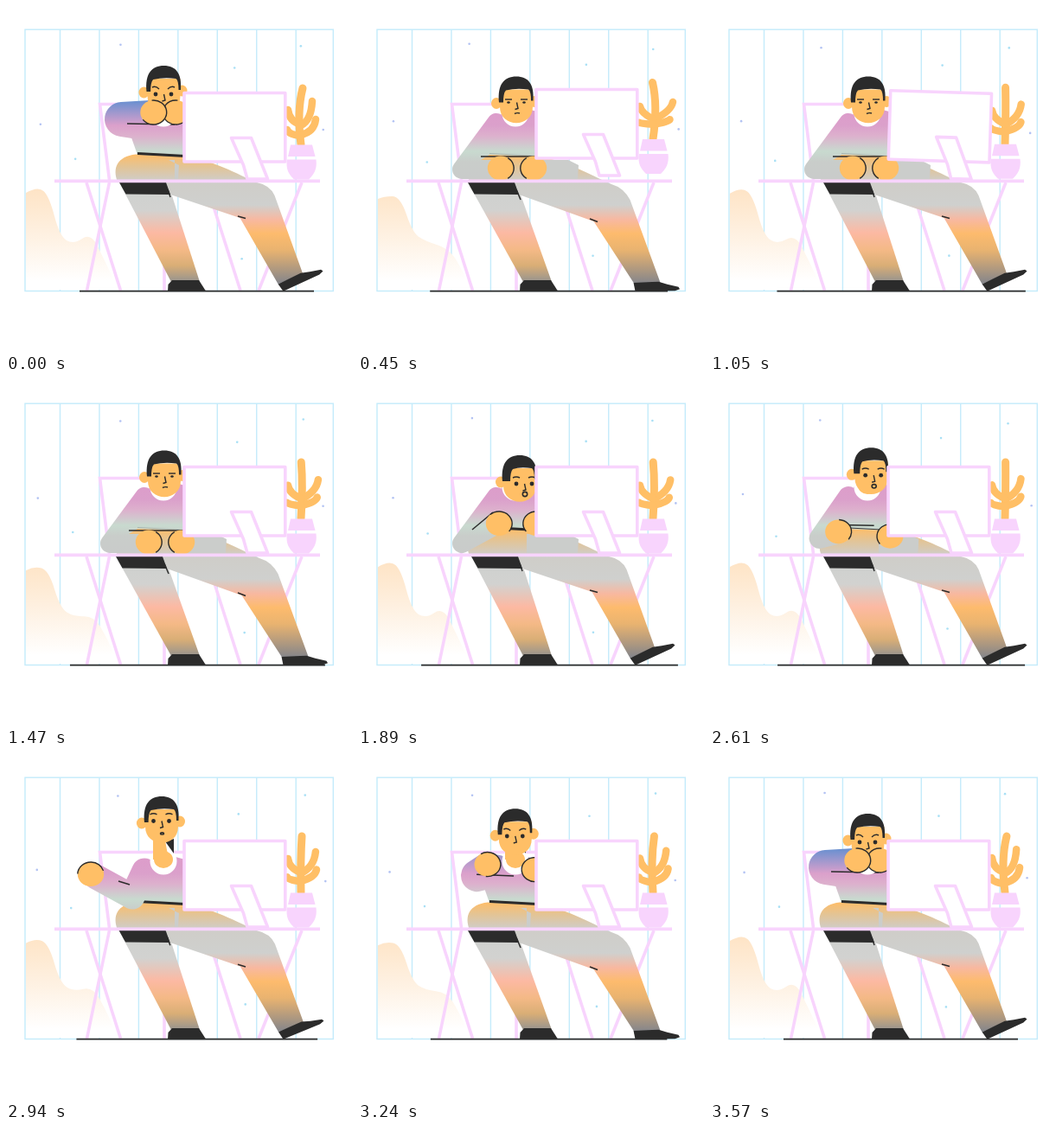
Recreate the animation shown at these times as an HTML page with a canvas. Size 400x400 px, loop 3.6 s.

```html
<!DOCTYPE html>
<html lang="en">
<head>
<meta charset="utf-8">
<title>Desk work</title>
<style>
html, body { margin: 0; width: 100%; height: 100%; overflow: hidden; background: #fff; }
canvas { display: block; }
</style>
</head>
<body>
<canvas id="stage" width="400" height="400"></canvas>
<script>
const ctx = document.getElementById('stage').getContext('2d');
const LOOP = 3600, TAU = Math.PI * 2;
const INK = '#2b2b2b', SKIN = '#ffbf66', PINK = '#f8d4fd', BLUE = '#c4ebfb';
const SHOULDER = [160, 135];

const lerp = (a, b, k) => a + (b - a) * k;
const mix = (a, b, k) => a.map((v, i) => lerp(v, b[i], k));
const clamp = k => Math.min(1, Math.max(0, k));
const ease = k => k * k * (3 - 2 * k);
const wave = (t, peak, period) => .5 + .5 * Math.cos((t - peak) / period * TAU);

// eyes: offset of their middle; arc: middle and half width of the hand outline;
// mood: anger, surprise, wakefulness; reach: right arm on the desk
const type = {
  head: [183, 112.5], eyes: [0, -1], elbow: [120, 189], wrist: [165, 189], thick: [22],
  left: [165, 187.5], right: [203, 187.5], arc: [0, 1], crease: [142, 174, 205, 174],
  mood: [0, 0, 0], blue: [0], reach: [1], belt: [.2]
};
const shock = { ...type, head: [188.5, 119], eyes: [3.2, 2], mood: [0, 1, 1] };
const up = {
  ...shock, head: [187, 118], eyes: [5, 2], wrist: [155, 170], left: [163, 166],
  right: [206, 166], arc: [-.8, 1.5], crease: [132, 173, 156, 153], belt: [3]
};
const lean = {
  head: [182.5, 100], eyes: [-.5, 2], elbow: [134, 131], wrist: [168, 129], thick: [40],
  left: [170.5, 123], right: [196.5, 123], arc: [.4, 2.1], crease: [140, 136, 195, 137],
  mood: [1, 0, 1], blue: [1], reach: [0], belt: [3]
};
const greet = {
  ...lean, head: [180, 80], eyes: [-.5, -2.5], elbow: [146, 165], wrist: [104, 142], thick: [29],
  left: [98, 139], right: [224, 160], arc: [-1.7, 1.4], crease: [130, 147, 143, 151],
  mood: [0, .3, 1], blue: [0]
};
const ACTS = [
  [0, lean], [100, lean], [330, type], [1600, type], [1800, up], [1980, up],
  [2150, shock], [2520, shock], [2800, greet], [3060, greet], [3340, lean], [LOOP, lean]
];

function poseAt(t) {
  const i = ACTS.findIndex(([end]) => t < end);
  const [t0, a] = ACTS[i - 1], [t1, b] = ACTS[i];
  const k = ease((t - t0) / (t1 - t0)), pose = {};
  for (const part in a) pose[part] = mix(a[part], b[part], k);
  return pose;
}

// The desk is struck at a steady beat; every second blow tilts the screen.
function blowAt(t) {
  const beat = Math.round((t - 450) / 630);
  const force = beat < 0 || beat > 3 ? 0 : ease(clamp(1.15 - Math.abs(t - 450 - beat * 630) / 130));
  return beat % 2 ? { hop: 0, tilt: force } : { hop: force, tilt: 0 };
}

function fill(color) { ctx.fillStyle = color; ctx.fill(); }
function stroke(color, width) { ctx.strokeStyle = color; ctx.lineWidth = width; ctx.stroke(); }
function poly(p, open) {
  ctx.beginPath();
  for (let i = 0; i < p.length; i += 2) ctx.lineTo(p[i], p[i + 1]);
  if (!open) ctx.closePath();
}
function line(p, color, width) { poly(p, true); stroke(color, width); }
function oval(x, y, rx, ry = rx) { ctx.beginPath(); ctx.ellipse(x, y, rx, ry, 0, 0, TAU); }
function curve(x, y, ...rest) {
  const [width, color] = [rest.pop(), rest.pop()];
  ctx.beginPath();
  ctx.moveTo(x, y);
  ctx.quadraticCurveTo(...rest);
  stroke(color, width);
}
function shade(y0, y1, stops) {
  const g = ctx.createLinearGradient(0, y0, 0, y1);
  stops.forEach(([y, c]) => g.addColorStop((y - y0) / (y1 - y0), c));
  return g;
}

// x, y, start angle in turns, direction
const STARS = [
  [130, 46, -.08, -1], [266, 69.5, .36, 1], [343, 48, .61, -1], [38.5, 134.5, .17, -1],
  [78, 178.5, -.11, 1], [274, 290, .33, 1], [369, 144.5, .6, 1]
];

function drawRoom(t) {
  ctx.strokeStyle = BLUE;
  ctx.lineWidth = 1.4;
  ctx.strokeRect(22, 27.2, 356.3, 302.3);
  for (let i = 0; i < 7; i++) {
    const x = 62.5 + i * 45.45;
    line([x, 27, x, 329], BLUE, 1.4);
  }
  STARS.forEach(([x, y, start, dir], i) => {
    const a = (start + dir * t / 1800) * TAU;
    oval(x + 2.8 * Math.cos(a), y + 2.6 * Math.sin(a), 1.3);
    fill(i % 3 ? '#a9e0f5' : '#b3c3f3');
  });
}

function drawHill(k) {
  const p = mix([23, 216, 37, 208, 50, 220, 62, 266, 78, 276, 98, 262, 113, 292, 130, 328],
    [23, 223, 30, 220, 49, 220, 63, 262, 78, 272, 104, 280, 118, 300, 130, 328], k);
  ctx.beginPath();
  ctx.moveTo(23, 328);
  ctx.lineTo(p[0], p[1]);
  for (let i = 2; i < p.length - 2; i += 2) {
    ctx.quadraticCurveTo(p[i], p[i + 1], (p[i] + p[i + 2]) / 2, (p[i + 1] + p[i + 3]) / 2);
  }
  ctx.lineTo(130, 328);
  fill(shade(212, 320, [[212, '#fee4c6'], [262, '#fef0e0'], [318, '#ffffff']]));
}

function drawFurniture() {
  poly([108.5, 113.5, 210, 113.5, 210, 200, 119.5, 200]);
  fill('#fff');
  line([210, 113.5, 108.5, 113.5, 119.5, 201], PINK, 3.6);
  for (const [top, foot] of [[183, 183], [93, 132.5], [119.5, 93.5], [231, 271], [342, 292]]) {
    line([top, 204, foot, 329], PINK, 3.6);
  }
}

function drawLegs(k) {
  const slide = -4 * k, tip = -.42 * (1 - k);
  const foot = (x, y) => [
    320.5 + x * Math.cos(tip) - y * Math.sin(tip),
    329.7 + x * Math.sin(tip) + y * Math.cos(tip)
  ];
  poly([131 + slide, 204, 187 + slide, 204, 224, 319, 191, 319]);
  fill(shade(204, 319, [[204, '#cdd0ce'], [236, '#d2d2d0'], [262, '#fcb9a3'], [282, '#f4b986'],
    [300, '#d9ae76'], [319, '#96938f']]));

  ctx.beginPath();
  ctx.moveTo(129, 203);
  ctx.bezierCurveTo(123, 188, 128, 174, 150, 171.5);
  ctx.lineTo(200, 172);
  ctx.bezierCurveTo(238, 177, 268, 195, 290 + 3 * k, 204 + 2 * k);
  ctx.quadraticCurveTo(305 + 2 * k, 207 + 3 * k, 310.5 + 4 * k, 219 + 5 * k);
  ctx.lineTo(...foot(29, -10));
  ctx.lineTo(...foot(-2, -10));
  ctx.lineTo(270.5 + 2 * k, 245 + 4 * k);
  ctx.lineTo(190 + slide, 218);
  ctx.lineTo(185 + slide, 203);
  fill(shade(172, 320, [[172, '#fdbd6a'], [186, '#e2c497'], [202, '#cfcdc8'], [230, '#cfd0ce'],
    [247, '#f8b8a0'], [263, '#fdbb6d'], [282, '#e9b370'], [320, '#86868a']]));

  poly([131 + slide, 204, 185 + slide, 204, 190 + slide, 218, 138.5 + slide, 217.5]);
  fill(INK);
  line([187 + slide, 212, 190 + slide / 2, 221 + 3 * k], INK, 1.5);
  line([268, 243 + 3 * k, 277, 245.5 + 4 * k], INK, 1.6);

  poly([192, 317, 223, 317, 231, 329.5, 187, 329.5, 187.5, 322]);
  fill(INK);
  poly([foot(0, 0), foot(-2, -10), foot(27, -11), foot(37, -8), foot(50, -5), foot(51.5, -2.5),
    foot(46, -.5)].flat());
  fill(INK);
}

function drawHand([x, y], middle, half) {
  oval(x, y, 15.2, 14);
  fill(SKIN);
  ctx.beginPath();
  ctx.ellipse(x, y, 15.2, 14, 0, middle - half, middle + half);
  stroke(INK, 1.4);
}

function drawHead({ head, eyes: [mid, ey], mood: [angry, shocked, awake] }) {
  ctx.save();
  ctx.translate(...head);
  oval(-23 + mid * .2, 0, 6, 6.5);
  fill(SKIN);
  oval(21, -2, 6, 6.5);
  fill(SKIN);
  ctx.beginPath();
  ctx.moveTo(-19, -16);
  ctx.lineTo(19, -16);
  ctx.lineTo(19, 4);
  ctx.bezierCurveTo(19, 29, -19, 29, -19, 4);
  fill(SKIN);

  const burn = -15 + mid * .8;
  ctx.beginPath();
  ctx.moveTo(-20, -1);
  ctx.bezierCurveTo(-22, -22, -14, -31, 0, -31);
  ctx.bezierCurveTo(14, -31, 21, -22, 19.5, -3);
  ctx.lineTo(17, -3);
  ctx.quadraticCurveTo(17, -14, 14, -16);
  ctx.quadraticCurveTo(0, -18, burn + 3, -15);
  ctx.quadraticCurveTo(burn, -12, burn, -1);
  fill(INK);

  for (const side of [-1, 1]) {
    const ex = mid + side * 9, brow = ey - 3.5 - 4.5 * awake + shocked;
    oval(ex, ey, 1.8 + .6 * awake, 1.3 + 1.1 * awake);
    fill(INK);
    curve(ex - 4, brow + (side > 0 ? 2 * angry : 0), ex, brow - 2 * awake,
      ex + 4, brow + (side < 0 ? 2 * angry : 0), INK, 1.4);
  }
  line([mid + .5, ey, mid + 2, ey + 7, mid - 1.5, ey + 8], INK, 1.4);
  if (shocked > .2) {
    oval(mid + 1, 11 + 3 * shocked, 1.7 + shocked, .4 + 2.2 * shocked);
    stroke(INK, 1.6);
  } else if (angry < .5) {
    curve(mid - 2, 12, mid + 1, 10.5, mid + 4, 11.5, INK, 1.4);
  }
  ctx.restore();
}

function drawPerson(pose) {
  const { head, elbow, wrist, thick, left, right, arc, crease, blue, reach, belt } = pose;
  const top = mix([222, 154, 202], [106, 144, 208], blue[0]).map(Math.round);
  const cloth = shade(110, 200, [[110, `rgb(${top})`], [138, '#dba0cb'], [150, '#ddb0cd'],
    [168, '#c8dacf'], [180, '#c9cdca'], [200, '#c9cbca']]);

  const tip = lerp(200, 255, reach[0]);
  poly([195, 178, tip - 12, 178, tip, 184, tip - 1, 200, 195, 200]);
  fill('#cbcdcb');

  poly([168, 121, ...SHOULDER, ...mix(elbow, [160, 172], .3), 152, 172, 207, 174, 207, 122, 196, 119]);
  fill(cloth);
  line([152, 170.5, 180, 172, 207, 173.5], INK, belt[0]);
  ctx.lineJoin = ctx.lineCap = 'round';
  line([...SHOULDER, ...elbow, ...wrist], cloth, thick[0]);
  ctx.lineJoin = 'miter';
  ctx.lineCap = 'butt';
  line(crease, INK, 1.5);

  oval(182, 124, 15.5);
  fill('#fff');
  oval(182, 122, 11, 10);
  fill(SKIN);
  if (head[1] < 98) {
    poly([184, 101, 194, 98, 194, 115]);
    fill(INK);
    poly([170, 96, 184, 100, 188, 122, 170, 122]);
    fill(SKIN);
  }
  drawHead(pose);
  drawHand(right, Math.PI - arc[0], arc[1]);
  drawHand(left, ...arc);
}

function drawPlant(k, dy) {
  ctx.save();
  ctx.translate(0, dy);
  ctx.lineCap = 'round';
  curve(341, 160, 336 + 13 * k, 122, 343 - 3 * k, 95, SKIN, 9);
  const branch = (side, root, reach, rise) => curve(341, root, 341 + side * reach * .9,
    root - rise * lerp(.2, .5, k), 341 + side * reach, root - rise, SKIN, 8.5);
  branch(1, 138, 13 + 12 * k, 28 - 9 * k);
  branch(1, 149 - 7 * k, 17 + 3 * k, 18 - 15 * k);
  branch(-1, 137, 15, 17 - 3 * k);
  branch(-1, 150 - 8 * k, 16, 7 - 6 * k);

  poly([329, 160.5, 354, 160.5, 357.5, 174, 326, 174]);
  fill(PINK);
  ctx.beginPath();
  ctx.moveTo(325, 177.5);
  ctx.lineTo(358.5, 177.5);
  ctx.bezierCurveTo(360, 188, 356, 195, 350, 200.5);
  ctx.lineTo(333, 200.5);
  ctx.bezierCurveTo(327, 195, 323, 188, 325, 177.5);
  fill(PINK);
  ctx.restore();
}

function drawMonitor({ hop, tilt }) {
  ctx.save();
  ctx.translate(264.5 + 1.5 * tilt, 140.5 - 4 * hop - tilt);
  ctx.rotate(.032 * tilt);
  ctx.translate(-264.5, -140.5);
  ctx.lineJoin = 'round';
  const panels = [
    [206, 100.5, 322.8, 100.5, 322.8, 180, 206, 180],
    [260.5, 152.5, 283.5, 152.5, 302.5, 200, 279, 200, 274.5, 184]
  ];
  for (const panel of panels) {
    poly(panel);
    fill('#fff');
    stroke(PINK, 3.6);
  }
  ctx.restore();
}

function draw(t) {
  const blow = blowAt(t);
  const tap = ease(clamp((wave(t, 495, 900) - .3) / .5));
  const slump = wave(t, 430, 900) ** 2;
  const sway = .6 * Math.sin(t / LOOP * Math.PI) + .6 * blow.hop;
  const swing = Math.cos(t / LOOP * TAU);
  ctx.fillStyle = '#fff';
  ctx.fillRect(0, 0, 400, 400);
  drawRoom(t);
  drawHill(slump);
  drawFurniture();
  line([79 + 6 * swing, 329.6, 363 - 7 * swing, 329.6], INK, 1.7);
  drawLegs(tap);
  drawPerson(poseAt(t));
  drawPlant(sway, -6.5 * blow.hop - .7 * blow.tilt);
  drawMonitor(blow);
  line([56, 202.3, 363, 202.3], PINK, 3.8);
}

function tick() {
  draw(performance.now() % LOOP);
  requestAnimationFrame(tick);
}
tick();
</script>
</body>
</html>
```
